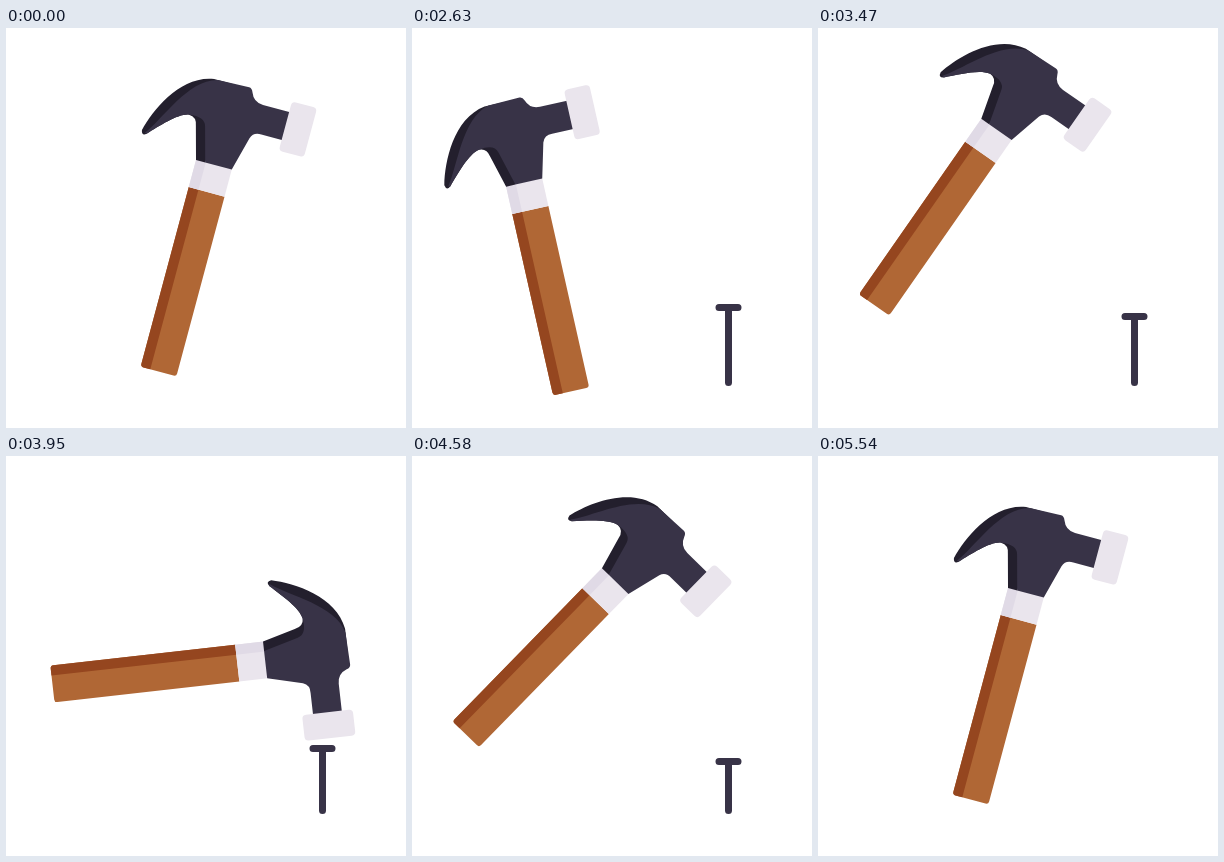
Animation, 400 px wide and 400 px high, one loop 5570 ms. Source, as an HTML page:

```html
<!DOCTYPE html>
<html lang="en">
<head>
<meta charset="utf-8">
<title>Hammer and nail</title>
<style>
  html, body { margin: 0; width: 100%; height: 100%; overflow: hidden; background: #fff; }
  svg { display: block; width: 100%; height: 100%; }
</style>
</head>
<body>
<svg viewBox="0 0 400 400">
  <g id="nail" fill="none" stroke="#383347" stroke-width="7" stroke-linecap="round">
    <path id="nailPath"/>
  </g>
  <!-- Upright hammer; the origin is the middle of the handle's end -->
  <g id="hammer">
    <path fill="#b06735" d="M-18.5-186H18.5V-3Q18.5 0 15.5 0H-15.5Q-18.5 0-18.5-3Z"/>
    <path fill="#95461f" d="M-18.5-186H-8.5V0H-15.5Q-18.5 0-18.5-3Z"/>
    <path fill="#eae5ed" d="M-18.5-214.5H18.5V-186H-18.5Z"/>
    <path fill="#e0dae6" d="M-18.5-214.5H-8.5V-186H-18.5Z"/>
    <path fill="#231f2d" d="M-18.5-214L-27.5-247Q-29-256-37-256C-48-254-62-238-73-226.5Q-77.5-223-78.5-229C-73-252-55-292-22-297L0-297L-9-214Z"/>
    <path fill="#383347" d="M-9-214L-18.5-249Q-21-258.5-37-256C-48-254-62-238-73-226.5L-75-227C-61-245-47-290-18-297L14-298Q17-298 18.5-294Q22-284.5 32-284.5H62V-255.5H38Q30-256 27.5-249L18.5-214Z"/>
    <rect x="59" y="-295.5" width="26" height="51" rx="4" fill="#eae5ed"/>
  </g>
</svg>
<script>
const LOOP = 5570;
const GRIP = 22.8; // distance of the pivot from the handle's end
const HITS = [3384, 3954, 4524];
const HIT_ANGLE = 84.2;

const smooth = p => (1 - Math.cos(Math.PI * p)) / 2;
const rise = p => 1 - (1 - p) ** 3;
const fall = p => p ** 1.5;

// time, pivot x, pivot y, angle, easing towards this pose
const poses = [
  [2000, 158.4, 321.5, 15],
  [2240, 158, 328, 30, smooth],
  [2810, 153, 345, -25, smooth],
  [HITS[0], 69.1, 216, HIT_ANGLE, smooth],
  [3564, 69.1, 265, 27, rise],
  [HITS[1], 69.1, 225, HIT_ANGLE, fall],
  [4134, 69.1, 268, 24, rise],
  [HITS[2], 69.1, 234, HIT_ANGLE, fall],
  [4730, 70, 279, 20, rise],
  [4890, 97, 288, 64, smooth],
  [5290, 158.4, 321.5, 10, smooth],
  [5530, 158.4, 321.5, 15, smooth]
];

const hammer = document.getElementById('hammer');
const nail = document.getElementById('nail');
const nailPath = document.getElementById('nailPath');
const ramp = (t, from, to) => Math.min(1, Math.max(0, (t - from) / (to - from)));

function poseAt(t) {
  const i = poses.findIndex(pose => pose[0] > t);
  if (i < 1) return poses[0].slice(1, 4);
  const a = poses[i - 1], b = poses[i];
  const p = b[4](ramp(t, a[0], b[0]));
  return [1, 2, 3].map(k => a[k] + (b[k] - a[k]) * p);
}

function draw(t) {
  const [x, y, angle] = poseAt(t);
  hammer.setAttribute('transform', `translate(${x} ${y}) rotate(${angle}) translate(0 ${GRIP})`);

  const sunk = HITS.reduce((sum, hit) => sum + 9 * ramp(t, hit - 60, hit + 70), 0);
  const top = 279.5 + sunk;
  const size = smooth(ramp(t, 2420, 2580)) * (1 - smooth(ramp(t, 4640, 4820)));
  nailPath.setAttribute('d', `M307 ${top}H326M316.5 ${top}V354.5`);
  nail.setAttribute('transform', `translate(316.5 358) scale(${size}) translate(-316.5 -358)`);
  nail.setAttribute('visibility', size > 0 ? 'visible' : 'hidden');
}

const start = performance.now();
function tick() {
  draw((performance.now() - start) % LOOP);
  requestAnimationFrame(tick);
}
tick();
</script>
</body>
</html>
```
